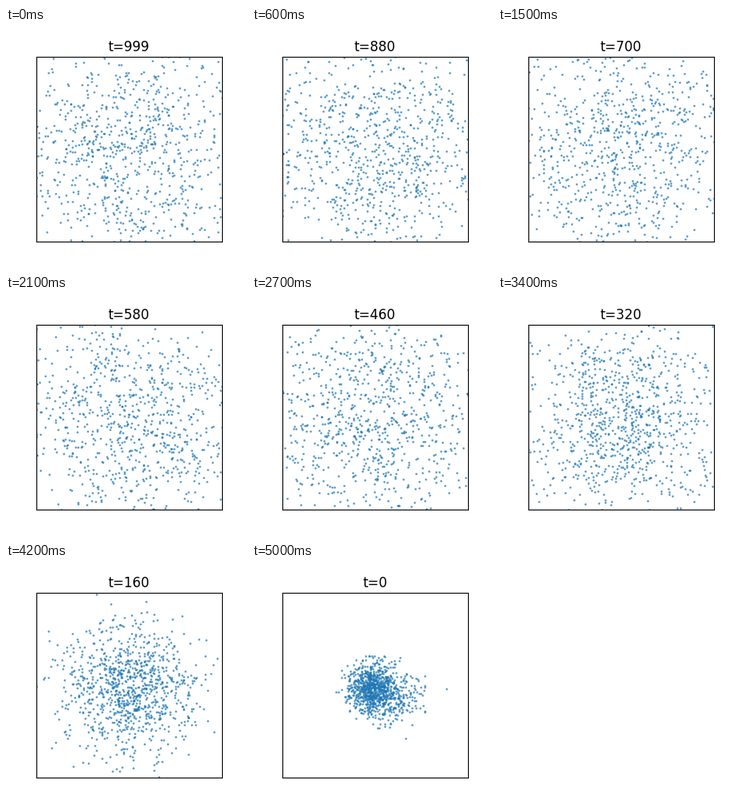
Animation of 300 by 300 pixels, one loop 5.1 s. Source, as a matplotlib script:

```python
import numpy as np
import matplotlib.pyplot as plt
from matplotlib.animation import FuncAnimation

COUNT = 1000
STEPS = 1000
STRIDE = 20
LIMIT = 1.5

rng = np.random.default_rng(7)


def blob(n, center, spread):
    return rng.normal(center, spread, (n, 2))


def clean_cloud():
    """Dense core with a looser tail towards the lower right."""
    core = blob(680, (-0.07, 0.0), (0.205, 0.2))
    tail = blob(COUNT - 682, (0.22, -0.18), (0.24, 0.21))
    cloud = np.vstack([core, tail]).clip((-0.63, -0.7), (0.8, 0.47))
    strays = [(1.15, -0.06), (0.49, -0.86)]
    return np.vstack([cloud, strays])


def diffuse(points, times):
    """Noise the cloud step by step under a linear beta schedule."""
    keep = np.cumprod(1 - np.linspace(1e-4, 0.02, STEPS))
    path = [points]
    for a, b in zip(times[:-1], times[1:]):
        ratio = keep[b] / keep[a]
        noise = rng.standard_normal(points.shape)
        points = np.sqrt(ratio) * points + np.sqrt(1 - ratio) * noise
        path.append(points)
    return path


times = [min(t, STEPS - 1) for t in range(0, STEPS + 1, STRIDE)]
path = diffuse(clean_cloud(), times)[::-1]
labels = times[::-1]

fig, ax = plt.subplots(figsize=(3, 3), dpi=100)
ax.set(xlim=(-LIMIT, LIMIT), ylim=(-LIMIT, LIMIT), xticks=[], yticks=[])
dots = ax.scatter(*path[0].T, s=1, alpha=0.6, color="tab:blue")
title = ax.set_title("t=999", pad=5.3)


def draw(i):
    dots.set_offsets(path[i])
    title.set_text(f"t={labels[i]}")
    return dots, title


anim = FuncAnimation(fig, draw, frames=len(path), interval=100,
                     repeat=True, repeat_delay=0)
plt.show()
```
